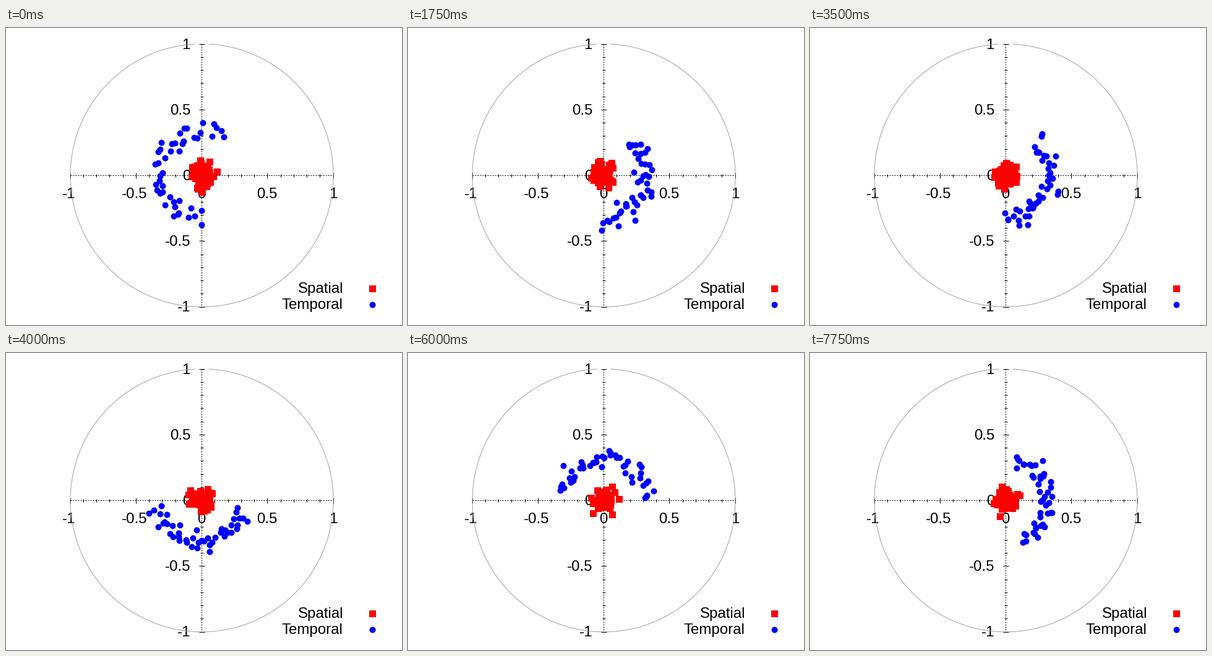
Animation, 640 px wide and 480 px high, one loop 8 s. Source, as a matplotlib script:

```python
import matplotlib.pyplot as plt
import numpy as np
from matplotlib.animation import FuncAnimation
from matplotlib.patches import Arc

W, H, DPI = 640, 480, 80
PT = 72 / DPI                      # points per pixel
CX, CY, R = 316, 238, 212.5        # plot centre and unit radius in pixels
FRAMES, INTERVAL = 32, 250
BLUES, REDS = 45, 60

# Turning points of the temporal arc: frame, heading and half width in degrees
SWING = np.array([
    (0, 165, 105), (3, 90, 70), (5, 180, 65), (7, 340, 72), (11, 280, 75),
    (13, 375, 65), (16, 268, 80), (20, 354, 38), (21, 335, 60),
    (24, 445, 82), (26, 540, 65), (28, 575, 60), (30, 500, 60), (31, 364, 72),
]).T

plt.rcParams["font.family"] = "Liberation Sans"
fig = plt.figure(figsize=(W / DPI, H / DPI), dpi=DPI, facecolor="white")
ax = fig.add_axes([0, 0, 1, 1])
ax.set_xlim(0, W)
ax.set_ylim(H, 0)
ax.axis("off")


def temporal(k, rng):
    """Points spread evenly, with jitter, along a noisy arc."""
    when, headings, widths = SWING
    heading, width = np.interp(k, when, headings), np.interp(k, when, widths)
    along = np.linspace(-1, 1, BLUES) + rng.normal(0, .04, BLUES)
    angle = np.radians(heading + width * np.clip(along, -1, 1))
    radius = np.clip(rng.normal(.33, .04, BLUES), .23, .42)
    return CX + R * radius * np.cos(angle), CY - R * radius * np.sin(angle)


def spatial(rng):
    """A round cloud about the centre with a few stragglers."""
    x, y = rng.normal(0, .045, (2, REDS))
    pull = R * np.minimum(1, .13 / np.hypot(x, y))
    return CX + pull * x, CY - pull * y


def line(xs, ys, **style):
    ax.plot(xs, ys, color="black", lw=PT, solid_capstyle="butt", zorder=1, **style)


def label(x, y, text, align):
    ax.text(x, y, text, size=24 * PT, ha=align, va="baseline", zorder=2)


def dots(marker, color, size):
    return ax.plot([], [], marker, color=color, ms=size * PT, mew=0, zorder=4)[0]


# Unit circle, open just around the top tick
ax.add_patch(Arc((CX + .5, CY + .2), 2 * R, 2 * R, theta1=-87, theta2=267,
                 ec="#a0a0a0", lw=PT, zorder=3))

line([CX - R, CX + R], [CY, CY], dashes=(2, 2))
line([CX, CX], [CY - R, CY + R], dashes=(2, 2))
for i in range(-10, 11):
    half = 4.5 if i % 5 == 0 else 2.5
    p = i * R / 10
    line([CX + p] * 2, [CY - half, CY + half])
    line([CX - half, CX + half], [CY - p] * 2)

for v in (-1, -.5, 0, .5, 1):
    shift = -2 if v < 0 else 0     # the minus sign hangs to the left
    label(CX + v * R + shift, 275, f"{v:g}", "center")
    label(298, CY - v * R + 8, f"{v:g}", "right")

label(545, 428, "Spatial", "right")
label(544, 454, "Temporal", "right")
dots("s", "red", 11).set_data([592], [421])
dots("o", "blue", 10).set_data([592], [447])

red = dots("s", "red", 11)
blue = dots("o", "blue", 10)


def draw(k):
    rng = np.random.default_rng(100 + k)
    blue.set_data(*temporal(k, rng))
    red.set_data(*spatial(rng))
    return red, blue


anim = FuncAnimation(fig, draw, frames=FRAMES, interval=INTERVAL,
                     repeat=True, repeat_delay=0)
plt.show()
```
